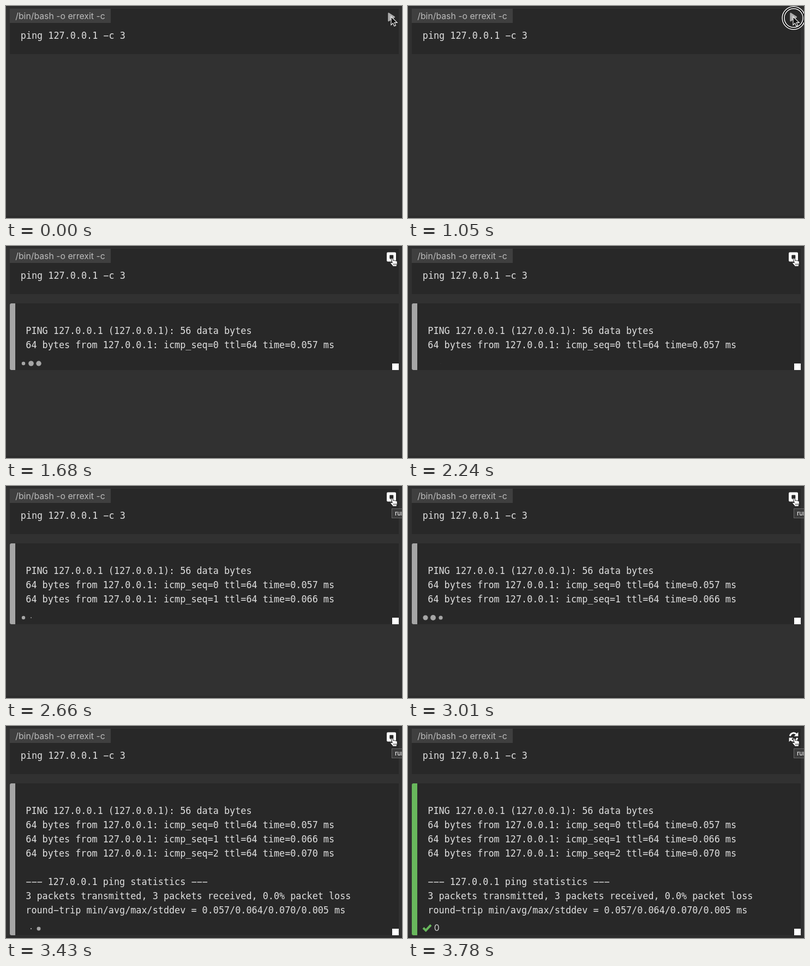
An HTML page for the animation above (5.25 s loop, 726 by 388 pixels).

```html
<!DOCTYPE html>
<html lang="en">
<head>
<meta charset="utf-8">
<title>Shell run</title>
<style>
  html, body { margin: 0; width: 100%; height: 100%; overflow: hidden; background: #303030; }
  svg { display: block; width: 726px; height: 388px; }
  text { white-space: pre; }
  .mono { font: 16.8px "DejaVu Sans Mono", monospace; fill: #e0e0e0; }
  .sans { font: 15.8px Inter, sans-serif; fill: #bcbcbc; }
  .code { font: 15.8px Inter, sans-serif; fill: #d4d4d4; }
  .tip { font: 500 11.3px Inter, sans-serif; fill: #e4e4e4; }
</style>
</head>
<body>
<svg viewBox="0 0 726 388">
  <rect width="726" height="388" fill="#2c2c2c"/>
  <rect y="3" width="726" height="381" fill="#313131"/>

  <rect x="7" y="5" width="713" height="83" fill="#282828"/>
  <rect x="7" y="5" width="185" height="26" fill="#3f3f3f"/>
  <text class="sans" x="17.2" y="24">/bin/bash -o errexit -c</text>
  <g id="command"></g>

  <g id="output">
    <rect id="panel" x="7" y="105" width="713" fill="#282828"/>
    <path id="bar"/>
    <g id="lines"></g>
    <g id="dots" fill="#a6a6a6"></g>
    <rect id="grip" x="708" width="12" height="12" fill="#fff"/>
    <g id="result">
      <path d="M28 369.5l4.7 4.7 9.3-10" fill="none" stroke="#68b85c" stroke-width="4"/>
      <text class="code" x="47.8" y="375">0</text>
    </g>
  </g>

  <path id="play" d="M701.5 13.5l10.5 6.7-10.5 6.8z" fill="#adadad" stroke="#adadad" stroke-width="2.4" stroke-linejoin="round"/>
  <g id="stop">
    <rect x="698" y="11.5" width="17" height="17" rx="2" fill="#fff"/>
    <rect x="703.3" y="16.5" width="7" height="7" rx="1" fill="#282828"/>
  </g>
  <g id="again" fill="none" stroke="#fff" stroke-width="3">
    <path d="M700.3 18.4a6.8 6.8 0 0 1 11.6-3.4M713.7 21.8a6.8 6.8 0 0 1-11.6 3.4"/>
    <path d="M715.4 11.2v7.6h-7.6zM698.6 29v-7.6h7.6z" fill="#fff" stroke="none"/>
  </g>

  <g id="tip">
    <rect x="707.5" y="41.5" width="40" height="17" fill="#3b3b3b" stroke="#686868"/>
    <text class="tip" x="713" y="54">run</text>
  </g>

  <g id="ring" fill="none">
    <circle cx="707" cy="22" r="19" stroke="#000" stroke-width="4"/>
    <circle cx="707" cy="22" r="20.8" stroke="#fff" stroke-width="1.5"/>
    <circle cx="707" cy="22" r="17.2" stroke="#fff" stroke-width="1.5"/>
  </g>
  <path id="arrow" d="M706 19.5v15.2l3.5-3.3 2.3 5.4 2.7-1.2-2.3-5.2h5z" fill="#111" stroke="#fff" stroke-width="1.1"/>
  <g id="hand">
    <path d="M708.3 31l-2.1-6.8c-.5-2 2-2.7 2.7-.8l1.2 3.6c.5-1.3 2.1-1.1 2.4.1.8-1 2.1-.7 2.4.5 1-.7 2.2-.1 2.3 1.2.4 3.7-.2 6-1.4 8.6h-6.5c-.8-2.4-2.9-3.7-4.3-5.5-.9-1.2.8-2.5 1.9-1.6z" fill="#fff" stroke="#111" stroke-width="1"/>
    <path d="M710.8 32v3.2M713 32v3.2M715.2 32v3.2" stroke="#222" stroke-width=".9"/>
  </g>
</svg>
<script>
const LOOP = 5250, TICK = 70;
const CLICK = 1050, RELEASE = 1120, START = 1190, TIP = 2590, DONE = 3500;

// [time, number of visible output lines]
const PRINTED = [[0, 0], [1330, 2], [2310, 3], [3430, 8]];
const reply = (n, ms) => `64 bytes from 127.0.0.1: icmp_seq=${n} ttl=64 time=${ms} ms`;
const TEXT = [
  'PING 127.0.0.1 (127.0.0.1): 56 data bytes',
  reply(0, '0.057'),
  reply(1, '0.066'),
  reply(2, '0.070'),
  '',
  '--- 127.0.0.1 ping statistics ---',
  '3 packets transmitted, 3 packets received, 0.0% packet loss',
  'round-trip min/avg/max/stddev = 0.057/0.064/0.070/0.005 ms'
];

const $ = id => document.getElementById(id);
const show = (id, on) => { $(id).style.display = on ? '' : 'none'; };

function add(parent, tag, attrs) {
  const el = document.createElementNS('http://www.w3.org/2000/svg', tag);
  for (const key in attrs) el.setAttribute(key, attrs[key]);
  return $(parent).appendChild(el);
}

// Terminal text, with hyphens set as wide dashes
function type(parent, x, y, text) {
  const el = add(parent, 'text', { class: 'mono', x, y });
  el.textContent = text.replace(/-/g, '\u2212');
  return el;
}

type('command', 26.8, 60, 'ping 127.0.0.1 -c 3');
const lines = TEXT.map((text, i) => type('lines', 36.3, 161 + 26 * i, text));
const dots = [32, 46, 60].map(cx => add('dots', 'circle', { cx }));

// cubic-bezier(.42, 0, .58, 1)
function easeInOut(x) {
  let lo = 0, hi = 1;
  for (let i = 0; i < 20; i++) {
    const u = (lo + hi) / 2, v = 1 - u;
    if (1.26 * v * v * u + 1.74 * v * u * u + u ** 3 < x) lo = u; else hi = u;
  }
  return lo * lo * (3 - 2 * lo);
}

// Grow for 560 ms, shrink for 560 ms, rest until 1400 ms
function bounce(ms) {
  const p = ((ms % 1400) + 1400) % 1400 / 560;
  return p < 1 ? easeInOut(p) : p < 2 ? 1 - easeInOut(p - 1) : 0;
}

function draw(t) {
  const running = t >= START && t < DONE, done = t >= DONE;
  show('output', t >= START);
  show('play', t < START);
  show('stop', running);
  show('again', done);
  show('result', done);
  show('dots', running);
  show('ring', t >= CLICK && t < RELEASE);
  show('arrow', t < START);
  show('hand', t >= START);
  show('tip', t >= TIP);

  const count = PRINTED.filter(([at]) => t >= at).pop()[1];
  lines.forEach((el, i) => { el.style.display = i < count ? '' : 'none'; });

  const bottom = 175 + 26 * count;
  $('panel').setAttribute('height', bottom - 105);
  $('grip').setAttribute('y', bottom - 12);
  $('bar').setAttribute('d', `M17 105V${bottom}H10q-3 0-3-3V108q0-3 3-3z`);
  $('bar').setAttribute('fill', done ? '#68b85c' : '#a6a6a6');

  const phase = t - (t < 2310 ? 890 : 935);
  dots.forEach((el, i) => {
    el.setAttribute('cy', bottom - 12);
    el.setAttribute('r', 5 * bounce(phase - 160 * i));
  });
}

const begin = performance.now();
function loop() {
  const t = (performance.now() - begin) % LOOP;
  draw(Math.floor(t / TICK) * TICK);
  requestAnimationFrame(loop);
}
loop();
</script>
</body>
</html>
```
